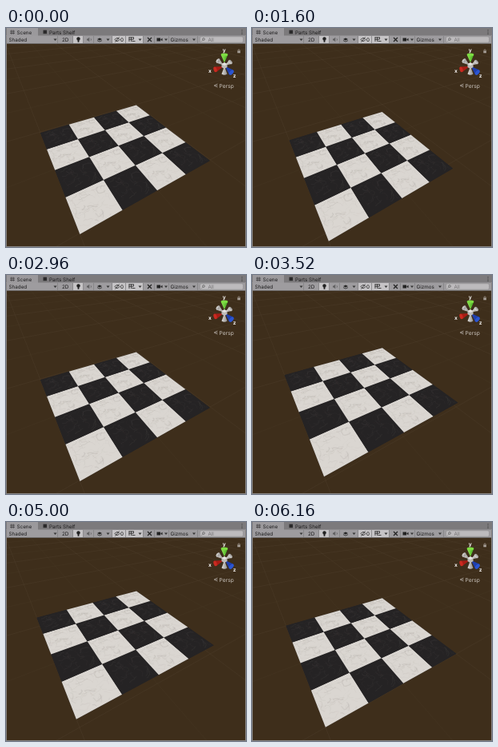
Write an HTML page with a canvas that moves like this. It is 300 px wide and 274 px high and loops after 6200 ms.

```html
<!DOCTYPE html>
<html lang="en">
<head>
<meta charset="utf-8">
<title>Floating board</title>
<style>
html, body { margin: 0; width: 100%; height: 100%; overflow: hidden; background: #3e2e1b; }
canvas, svg { position: absolute; left: 0; top: 0; width: 300px; height: 274px; display: block; }
text { font-family: Inter, Roboto, sans-serif; font-size: 6.3px; fill: #1c1b1c; text-rendering: geometricPrecision; }
.axis { font-size: 6.600px; font-weight: 700; fill: #f2f0ee; }
</style>
</head>
<body>
<canvas id="view" width="300" height="274"></canvas>
<svg viewBox="0 0 300 274">
  <defs>
    <path id="arrow" d="M-2-1H2L0 1.500Z" fill="#333"/>
    <linearGradient id="green"><stop stop-color="#98ec58"/><stop offset="1" stop-color="#3fa51c"/></linearGradient>
    <linearGradient id="grey"><stop stop-color="#dedcda"/><stop offset="1" stop-color="#92908e"/></linearGradient>
  </defs>

  <!-- tabs -->
  <rect width="300" height="10" fill="#7c7a7c"/>
  <rect x="1" width="39" height="10" fill="#9b999c"/>
  <path d="M6.800 2.500v5.500M9.200 2.500v5.500M5 4.100h6M5 6.400h6" stroke="#3a393a" stroke-width=".7"/>
  <text x="13.500" y="7.500">Scene</text>
  <rect x="46.500" y="2.700" width="4.500" height="4.500" fill="#2b2a2b"/>
  <text x="54" y="7.500">Parts Shelf</text>
  <g fill="#333"><circle cx="295" cy="2.800" r=".6"/><circle cx="295" cy="5" r=".6"/><circle cx="295" cy="7.200" r=".6"/></g>

  <!-- toolbar -->
  <rect y="9.500" width="300" height="10" fill="#9e9c9f"/>
  <path d="M84 10h12.500v9h-12.500zM133 10h38v9h-38z" fill="#c6c4c6"/>
  <path d="M64.500 10v9M83.500 10v9M96.500 10v9M109.500 10v9M132.500 10v9M149.500 10v9M171.500 10v9M185.500 10v9M203.500 10v9M239.500 10v9" stroke="#858386" stroke-width=".8"/>
  <path d="M0 19.500H300" stroke="#6f6c6b"/>
  <text x="3.500" y="16.700">Shaded</text>
  <text x="70" y="16.700">2D</text>
  <text x="143" y="16.700">0</text>
  <text x="205.500" y="16.700">Gizmos</text>
  <use href="#arrow" x="61.500" y="14.500"/><use href="#arrow" x="127.500" y="14.500"/>
  <use href="#arrow" x="167.500" y="14.500"/><use href="#arrow" x="200" y="14.500"/>
  <use href="#arrow" x="235" y="14.500"/>
  <g fill="#222">
    <circle cx="90.500" cy="13.500" r="2.200"/><path d="M89.600 15h1.800v2.800h-1.800z"/>
    <path d="M101 13.600h1.300l1.900-1.800v5.400l-1.900-1.800h-1.300z" opacity=".5"/>
    <path d="M114 14l3-1.500 3 1.500-3 1.500zM114 16l3 1.500 3-1.500v-.8l-3 1.500-3-1.500z"/>
    <path d="M188.500 12.500h4.500v4h-4.500zM193.500 14l2-1.200v3.500l-2-1.200z"/>
  </g>
  <g fill="none" stroke="#222" stroke-width=".8">
    <path d="M106 13.300q1 1.200 0 2.400" opacity=".5"/>
    <path d="M136 14.500q3-4 6 0q-3 4-6 0M136.500 17.500l5-6"/>
    <path d="M153.500 11.800h6M153.500 14.200h6M154 11.500v5.500M156.700 11.500v5.500M159.500 11.500v2.500M157.500 16.500h4"/>
    <path d="M177 12l5 5M182 12l-5 5" stroke-width="1.200"/>
  </g>
  <rect x="242.500" y="10.800" width="54" height="7.400" rx="2" fill="#bdbbbd" stroke="#8f8d8f" stroke-width=".6"/>
  <g fill="none" stroke="#666" stroke-width=".8"><circle cx="247" cy="14" r="1.400"/><path d="M246 15.200l-1.400 1.400"/></g>
  <text x="252.500" y="16.700" style="fill:#757375">All</text>

  <!-- orientation gizmo -->
  <g fill="url(#grey)">
    <path d="M272 46.500l-9-3 3.500-5z"/><ellipse cx="265" cy="41" rx="2" ry="3" transform="rotate(36 265 41)"/>
    <path d="M274 46.500l4.500-6 4 4.500z"/><ellipse cx="280.500" cy="42.500" rx="1.900" ry="3" transform="rotate(-42 280.500 42.500)"/>
    <path d="M273 48l-3.500 9.500q3.500 2.500 7 0z"/>
  </g>
  <path d="M272 48l-11 .5 2 6.500z" fill="#a81c15"/>
  <ellipse cx="261.500" cy="51.800" rx="2" ry="3.400" transform="rotate(-18 261.500 51.800)" fill="#c92a20"/>
  <path d="M274 48l10 4.500-5 6z" fill="#1f3fae"/>
  <ellipse cx="281.800" cy="55.700" rx="2.200" ry="3.700" transform="rotate(40 281.800 55.700)" fill="#2b55d2"/>
  <path d="M268.700 33.500h8.600l-4.300 10z" fill="url(#green)"/>
  <ellipse cx="273" cy="33.500" rx="4.300" ry="1.900" fill="#7ddc42"/>
  <path d="M269.500 45l3.500-1.800 3.500 1.800v4l-3.500 2.300-3.500-2.300z" fill="#bebcba"/>
  <path d="M269.500 45l3.500-1.800 3.500 1.800-3.500 2z" fill="#e6e4e2"/>
  <text class="axis" x="270.800" y="29.500">y</text>
  <text class="axis" x="253" y="55.500">x</text>
  <text class="axis" x="283.800" y="62.300">z</text>
  <path d="M289.300 28.500h3.600v2.800h-3.600z" fill="#a8a099"/>
  <path d="M290 28.500v-1q1.100-1.500 2.200 0v1" fill="none" stroke="#a8a099" stroke-width=".7"/>
  <path d="M264.500 69.900l-4.500 2.100 4.500 2.100M261 72h3.500" fill="none" stroke="#b5aea6" stroke-width=".7"/>
  <text x="266.500" y="74.500" style="fill:#c9c3bc;font-size:6.700px">Persp</text>

  <path d="M.5 10V274M299.500 10V274M0 273.500H300" stroke="#858280"/>
</svg>
<script>
const ctx = document.getElementById('view').getContext('2d');
const LOOP = 6200, STEP = 40, N = 4;
const LIFT = 0.0655, DOWN = [155.4, 416];

// Homogeneous screen corners of the board at rest: [x, y, depth]
const near = [92, 257, 1], left = [42.6, 130.2, 1.72], right = [255.3, 165, 1.47];
const lift = ([x, y, w]) => [x * w, y * w, w];
const origin = lift(near);
const axisU = lift(left).map((c, i) => c - origin[i]);
const axisV = lift(right).map((c, i) => c - origin[i]);

function project(u, v, h) {
  const k = h * LIFT;
  const [x, y, w] = origin.map((c, i) => c + axisU[i] * u + axisV[i] * v);
  const d = w + k;
  return [(x + k * DOWN[0]) / d, (y + k * DOWN[1]) / d, d];
}

function makeRandom(seed) {
  return () => (seed = (seed * 16807) % 2147483647) / 2147483647;
}

// Veins are short random walks inside a unit tile
function makeVeins(seed, count) {
  const rnd = makeRandom(seed), veins = [];
  for (let i = 0; i < count; i++) {
    let x = rnd(), y = rnd(), dir = rnd() * 6.28;
    const pts = [], size = 3 + rnd() * 6;
    for (let j = 0; j < size; j++) {
      if (x < 0.02 || x > 0.98 || y < 0.02 || y > 0.98) break;
      pts.push([x, y]);
      dir += (rnd() - 0.5) * 2.2;
      x += Math.cos(dir) * 0.05;
      y += Math.sin(dir) * 0.05;
    }
    if (pts.length > 1) veins.push({ pts, alpha: 0.2 + rnd() * 0.8, width: 0.4 + rnd() * 0.9 });
  }
  return veins;
}

const marble = [
  { base: '#dad6d1', ink: '130,123,116', strength: 0.17, veins: makeVeins(731, 60) },
  { base: '#252324', ink: '130,125,120', strength: 0.1, veins: makeVeins(4219, 40) }
];

function trace(points) {
  ctx.beginPath();
  points.forEach(([x, y]) => ctx.lineTo(x, y));
}

function quad(u, v, size, h, color) {
  trace([[u, v], [u + size, v], [u + size, v + size], [u, v + size]].map(([a, b]) => project(a, b, h)));
  ctx.closePath();
  ctx.fillStyle = color;
  ctx.fill();
}

function gridLine(at) {
  const pts = [];
  for (let s = -4; s <= 12; s += 0.25) {
    const p = project(...at(s), 0);
    if (p[2] > 0.15) pts.push(p);
  }
  trace(pts);
  ctx.stroke();
}

function drawGround() {
  ctx.fillStyle = '#3e2e1b';
  ctx.fillRect(0, 0, 300, 274);
  ctx.lineWidth = 0.8;
  for (let i = -8; i <= 20; i++) {
    ctx.strokeStyle = `rgba(150,140,125,${i % 2 ? 0.05 : 0.09})`;
    gridLine(s => [i / 2, s]);
    gridLine(s => [s, i / 2]);
  }
}

function drawTile(i, j, h) {
  const { base, ink, strength, veins } = marble[(i + j) % 2];
  quad(i / N, j / N, 1 / N, h, base);
  for (const { pts, alpha, width } of veins) {
    trace(pts.map(([x, y]) => project((i + x) / N, (j + y) / N, h)));
    ctx.strokeStyle = `rgba(${ink},${alpha * strength})`;
    ctx.lineWidth = width;
    ctx.stroke();
  }
}

function draw() {
  const t = Math.floor((performance.now() % LOOP) / STEP) * STEP;
  const h = Math.sin(t / 1000 + 0.09);
  drawGround();
  quad(0, 0, 1, h, marble[1].base);
  for (let i = 0; i < N; i++)
    for (let j = 0; j < N; j++) drawTile(i, j, h);
  requestAnimationFrame(draw);
}
draw();
</script>
</body>
</html>
```
